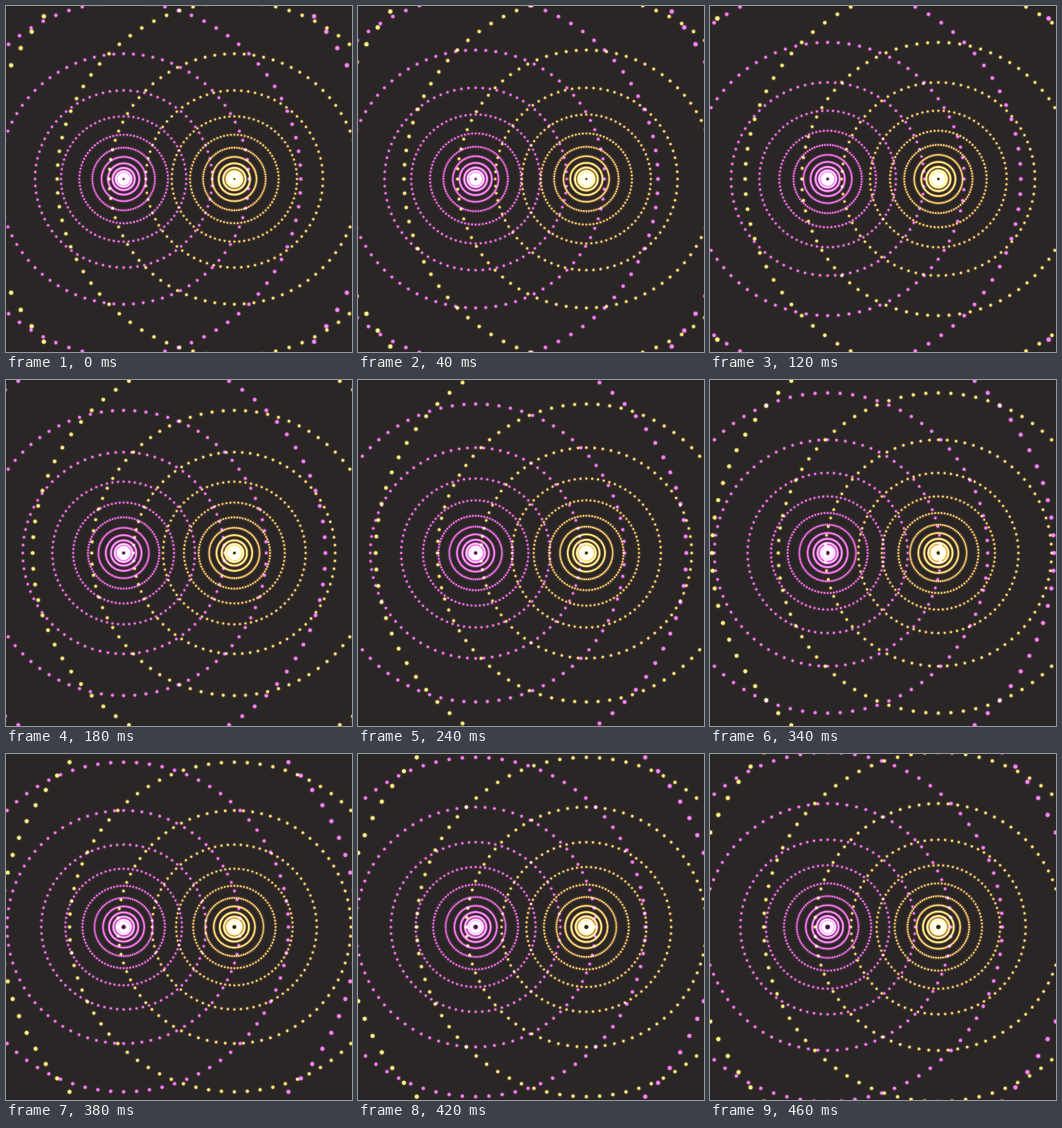
An HTML page with a canvas for the animation above (0.48 s loop, 500 by 500 pixels).

```html
<!DOCTYPE html>
<html lang="en">
<head>
<meta charset="utf-8">
<title>Twin ripples</title>
<style>
  html, body { margin: 0; width: 100%; height: 100%; overflow: hidden; background: #2a2626; }
  canvas { display: block; width: 500px; height: 500px; }
</style>
</head>
<body>
<canvas id="stage" width="500" height="500"></canvas>
<script>
const ctx = document.getElementById('stage').getContext('2d');
const STEP = 20, STEPS = 24, DOTS = 80;
const sources = [
  { x: 170, near: [238, 82, 218], far: [255, 96, 245] },
  { x: 330, near: [255, 180, 78], far: [255, 216, 96] }
];

const mix = (a, b, k) => a.map((v, i) => Math.round(v + (b[i] - v) * k));

// A crisp dot with a faint halo, centred on the origin
function dotPaint(size, reach, rgb) {
  const paint = ctx.createRadialGradient(0, 0, 0, 0, 0, reach);
  const stop = (d, alpha) => paint.addColorStop(d / reach, `rgba(${rgb},${alpha})`);
  stop(size - 0.4, 1);
  stop(size + 0.4, 0.2);
  stop(reach, 0);
  return paint;
}

function drawRing(source, r) {
  const size = 0.9 + 0.0055 * r;
  const reach = size + 2.2;
  const tone = Math.min(1, Math.max(0, (r - 90) / 260));
  ctx.fillStyle = dotPaint(size, reach, mix(source.near, source.far, tone));
  for (let i = 0; i < DOTS; i++) {
    const a = i / DOTS * 2 * Math.PI;
    ctx.setTransform(1, 0, 0, 1, source.x + r * Math.cos(a), 250 + r * Math.sin(a));
    ctx.fillRect(-reach, -reach, 2 * reach, 2 * reach);
  }
}

function draw(step) {
  ctx.setTransform(1, 0, 0, 1, 0, 0);
  ctx.globalCompositeOperation = 'source-over';
  ctx.fillStyle = '#2a2626';
  ctx.fillRect(0, 0, 500, 500);
  ctx.globalCompositeOperation = 'lighter';
  // Each ring grows by √2 per loop, into the place of the next one
  for (const source of sources)
    for (let k = 0; k < 14; k++) drawRing(source, 4 * 2 ** ((k + step / STEPS) / 2));
}

let shown = -1;
function tick() {
  const step = Math.floor(performance.now() / STEP) % STEPS;
  if (step !== shown) draw(shown = step);
  requestAnimationFrame(tick);
}
tick();
</script>
</body>
</html>
```
